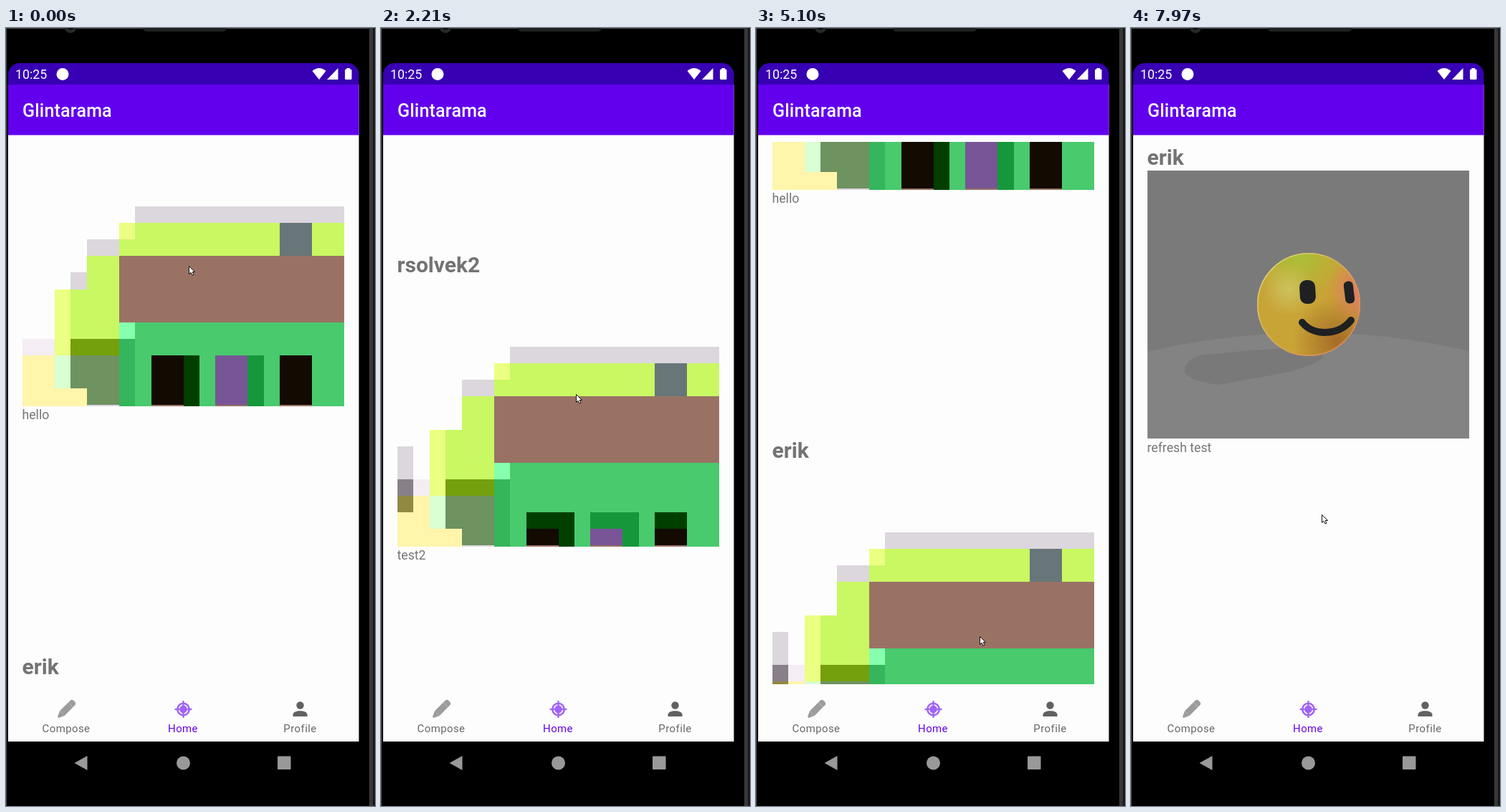
Recreate the animation shown at these times as an HTML page with a canvas. Size 515 by 1086 pixels, loop 8000 ms.

```html
<!DOCTYPE html>
<html lang="en">
<head>
<meta charset="utf-8">
<title>Photo feed</title>
<style>
html, body { margin: 0; width: 100%; height: 100%; overflow: hidden; background: #000; }
canvas { display: block; width: 515px; height: 1086px; }
</style>
</head>
<body>
<canvas id="stage" width="515" height="1086"></canvas>
<script>
const ctx = document.getElementById('stage').getContext('2d');
const LOOP = 8000;
const PITCH = 757;
const FONT = 'Roboto, "Noto Sans", sans-serif';

// [time, value]
const scrollKeys = [[0, 803], [1510, 1583], [2210, 2121], [2750, 3028], [3080, 3028],
  [3310, 2875], [3460, 2791], [5100, 1105], [6110, 202], [7000, 0], [8000, 0]];
// [time, x, y]
const mouseKeys = [[0, 255, 332], [1510, 269, 524], [2210, 272, 511], [2700, 268, 300],
  [3080, 243, 250], [3310, 243, 327], [3460, 244, 411], [5100, 312, 849],
  [6110, 306, 652], [7970, 266, 679], [8000, 266, 679]];

const posts = [
  { name: 'erik', caption: 'refresh test', ball: true },
  { name: 'erik', caption: 'hello', tall: true },
  { name: 'erik', caption: 'testimage', pole: true },
  { name: 'rsolvek2', caption: 'test2', pole: true },
  { name: 'rsolvek', caption: 'test' }
];

// Monotone cubic interpolation of column c
function track(keys, t, c) {
  const slope = i => (keys[i + 1][c] - keys[i][c]) / (keys[i + 1][0] - keys[i][0]);
  const tangent = i => {
    if (i === 0) return slope(0);
    if (i === keys.length - 1) return slope(i - 1);
    const a = slope(i - 1), b = slope(i);
    return a * b <= 0 ? 0 : 2 * a * b / (a + b);
  };
  let i = 0;
  while (i < keys.length - 2 && t >= keys[i + 1][0]) i++;
  const h = keys[i + 1][0] - keys[i][0];
  const u = (t - keys[i][0]) / h, v = 1 - u;
  return keys[i][c] * v * v * (1 + 2 * u) + keys[i + 1][c] * u * u * (3 - 2 * u) +
    h * u * v * (v * tangent(i) - u * tangent(i + 1));
}

// Rectangle given by its edges
function box(color, l, t, r, b) {
  ctx.fillStyle = color;
  ctx.fillRect(l, t, r - l, b - t);
}

function disc(color, x, y, r) {
  ctx.fillStyle = color;
  ctx.beginPath();
  ctx.arc(x, y, r, 0, Math.PI * 2);
  ctx.fill();
}

function ring(color, x, y, r, width) {
  ctx.strokeStyle = color;
  ctx.lineWidth = width;
  ctx.beginPath();
  ctx.arc(x, y, r, 0, Math.PI * 2);
  ctx.stroke();
}

function shape(color, d) {
  ctx.fillStyle = color;
  ctx.fill(new Path2D(d));
}

function pill(color, x, y, w, h, r) {
  ctx.fillStyle = color;
  ctx.beginPath();
  ctx.roundRect(x, y, w, h, r);
  ctx.fill();
}

function text(str, x, y, size, color, weight = 400, align = 'left', gap = 0) {
  ctx.font = `${weight} ${size}px ${FONT}`;
  ctx.letterSpacing = gap + 'px';
  ctx.textAlign = align;
  ctx.fillStyle = color;
  ctx.fillText(str, x, y);
}

// Rectangle in grid cells: 20 columns, 12 rows, the last row a thin strip
function cells(color, l, t, r, b) {
  const x = c => Math.round(23 + c * 22.45);
  const y = n => Math.min(375, Math.round(96 + n * 23.1));
  box(color, x(l), y(t), x(r), y(b));
}

function house(post) {
  const lilac = '#dcd6dd', lime = '#c9f862', pale = '#ebff82', cream = '#fff5ab';
  const brown = '#997264', black = '#130a02', pine = '#003f00';
  cells(lilac, 7, 0, 20, 1);
  cells(lilac, 4, 2, 6, 3);
  cells(lime, 6, 1, 20, 3);
  cells(pale, 6, 1, 7, 2);
  cells('#687679', 16, 1, 18, 3);
  cells(lime, 4, 3, 6, 8);
  cells(lime, 3, 5, 4, 8);
  cells(pale, 2, 5, 3, 9);
  cells(brown, 6, 3, 20, 7);
  cells('#48ca6d', 7, 7, 20, 13);
  cells('#86ffae', 6, 7, 7, 8);
  cells('#74a00d', 3, 8, 6, 9);
  cells('#35b55c', 6, 8, 7, 13);
  cells('#f4edf4', 0, 8, 2, 9);
  cells(cream, 0, 9, 4, 13);
  cells('#daffd2', 2, 9, 3, 11);
  cells('#6e9260', 3, 9, 6, 11);
  cells('#6e9260', 4, 11, 6, 12);
  cells(lilac, 4, 12, 6, 13);

  const top = post.tall ? 9 : 10;
  const sill = post.tall ? 9 : 11;
  cells(pine, 8, top, 11, 13);
  cells('#17973b', 12, top, 15, 13);
  cells(pine, 16, top, 18, 13);
  for (const [c, color] of [[8, black], [12, '#775596'], [16, black]]) {
    cells(color, c, sill, c + 2, 12);
    cells(brown, c, 12, c + 2, 13);
  }
  if (post.tall) cells(lilac, 3, 4, 4, 5);
  if (post.pole) {
    cells(lilac, 0, 6, 1, 8);
    cells('#887f88', 0, 8, 1, 9);
    cells('#918842', 0, 9, 1, 10);
  }
}

function glow(color, x, y, r) {
  const g = ctx.createRadialGradient(x, y, 0, x, y, r);
  g.addColorStop(0, color);
  g.addColorStop(1, color.slice(0, 7) + '00');
  ctx.fillStyle = g;
  ctx.fillRect(170, 110, 156, 156);
}

function ball() {
  box('#7a7a7a', 23, 0, 472, 374);
  shape('#838383', 'M23 253Q248 200 472 252V374H23Z');
  shape('#797979', 'M75 279C75 268 87 259 103 257L180 250C220 248 268 246 268 259C266 266 245 274 222 281L122 299C98 296 76 290 75 279Z');
  ctx.save();
  ctx.beginPath();
  ctx.arc(248, 187, 72, 0, Math.PI * 2);
  ctx.clip();
  box('#c8a336', 170, 110, 326, 266);
  glow('#a9c136ff', 234, 116, 66);
  glow('#cfc663e0', 220, 166, 38);
  glow('#a06325e0', 288, 238, 62);
  glow('#e8706cff', 324, 166, 50);
  ctx.restore();
  const rim = ctx.createLinearGradient(190, 130, 306, 244);
  rim.addColorStop(0, '#dcd67c');
  rim.addColorStop(.5, '#d8a95c');
  rim.addColorStop(1, '#dc8457');
  ring(rim, 248, 187, 71.3, 1.6);

  const ink = '#1e2022';
  for (const [x, y, w, h, tilt] of [[246.5, 169.5, 22, 33, -.06], [304.5, 170, 13, 31, -.12]]) {
    ctx.save();
    ctx.translate(x, y);
    ctx.rotate(tilt);
    pill(ink, -w / 2, -h / 2, w, h, w * .43);
    ctx.restore();
  }
  ctx.strokeStyle = ink;
  ctx.lineWidth = 10;
  ctx.lineCap = 'round';
  ctx.stroke(new Path2D('M239 212C254 231 290 231 307 209'));
}

function feed(scroll) {
  ctx.save();
  ctx.beginPath();
  ctx.rect(23, 159, 449, 757);
  ctx.clip();
  posts.forEach((post, i) => {
    const y = 181 + i * PITCH - scroll;
    if (y < -430 || y > 940) return;
    text(post.name, 22.5, y + 10, 30, '#737373', 700);
    text(post.caption, 22.5, y + 411, 17.7, '#757575');
    ctx.save();
    ctx.translate(0, y + 18);
    if (post.ball) ball();
    else house(post);
    ctx.restore();
  });
  ctx.restore();
}

function phone() {
  box('#000', 0, 0, 515, 1086);
  box('#4a4a4a', 0, 0, 515, 1);
  box('#4a4a4a', 0, 0, 1, 1086);
  box('#383838', 507, 0, 512, 1086);
  box('#1a1a1a', 512, 0, 515, 1086);
  disc('#29292c', 90, -1, 8);
  disc('#111318', 90, -1, 4);
  pill('#202020', 191, -6, 117, 11, 5);
  box('#fdfdfd', 3, 79, 492.5, 996);
  pill('#3700b3', 3, 49, 489.5, 30, [16, 16, 0, 0]);
  box('#6200ee', 3, 79, 492.5, 149.5);
}

function bars() {
  text('10:25', 13, 71, 17.8, '#fff');
  disc('#fff', 79, 64.5, 8.5);
  shape('#fff', 'M427.5 60Q437 52 446.5 60L437 72Z');
  shape('#fff', 'M463.5 56V72H448Z');
  pill('#fff', 473, 57.5, 9.5, 14.5, 1.5);
  box('#fff', 475.5, 56, 480, 58);
  text('Glintarama', 23, 124, 25, '#fff', 500, 'left', .2);

  // Pencil
  ctx.save();
  ctx.translate(84, 951);
  ctx.rotate(Math.PI / 4);
  pill('#9c9c9c', -4.7, -16, 9.4, 24, [4, 4, 0, 0]);
  shape('#9c9c9c', 'M-4.7 8H4.7L1 16H-1Z');
  box('#b9b9b9', -4.7, -9.5, 4.7, -8.7);
  ctx.restore();

  // Crosshair
  const violet = '#a063f5';
  disc(violet, 247.5, 951, 5.4);
  ring(violet, 247.5, 951, 8.2, 2.6);
  for (let i = 0; i < 4; i++) {
    ctx.save();
    ctx.translate(247.5, 951);
    ctx.rotate(i * Math.PI / 2);
    box(violet, -1.1, -12, 1.1, -5);
    ctx.restore();
  }

  // Person
  disc('#616161', 410.5, 945.5, 5.2);
  shape('#616161', 'M400.5 961V958.5C400.5 951.5 420.5 951.5 420.5 958.5V961Z');

  const tabs = [['Compose', 84, '#666'], ['Home', 247, '#6200ee'], ['Profile', 410.5, '#666']];
  for (const [label, x, color] of tabs) text(label, x, 983, 14.9, color, 400, 'center', .45);

  shape('#999', 'M95.5 1026L113.5 1016V1036Z');
  disc('#999', 247.5, 1026, 9.5);
  pill('#999', 379, 1016.5, 18.5, 18.5, 1);
}

function pointer(x, y) {
  ctx.save();
  ctx.translate(x, y);
  const arrow = new Path2D('M.5 .5V11.5L3 9.2L5 13.2L7 12.2L5.2 8.5H8.5Z');
  ctx.fillStyle = '#fff';
  ctx.fill(arrow);
  ctx.strokeStyle = '#111';
  ctx.lineWidth = 1;
  ctx.lineJoin = 'round';
  ctx.stroke(arrow);
  ctx.restore();
}

let start = null;
function draw(now) {
  if (start === null) start = now;
  const t = (now - start) % LOOP;
  phone();
  feed(Math.round(track(scrollKeys, t, 1)));
  bars();
  pointer(Math.round(track(mouseKeys, t, 1)), Math.round(track(mouseKeys, t, 2)));
  requestAnimationFrame(draw);
}
requestAnimationFrame(draw);
</script>
</body>
</html>
```
